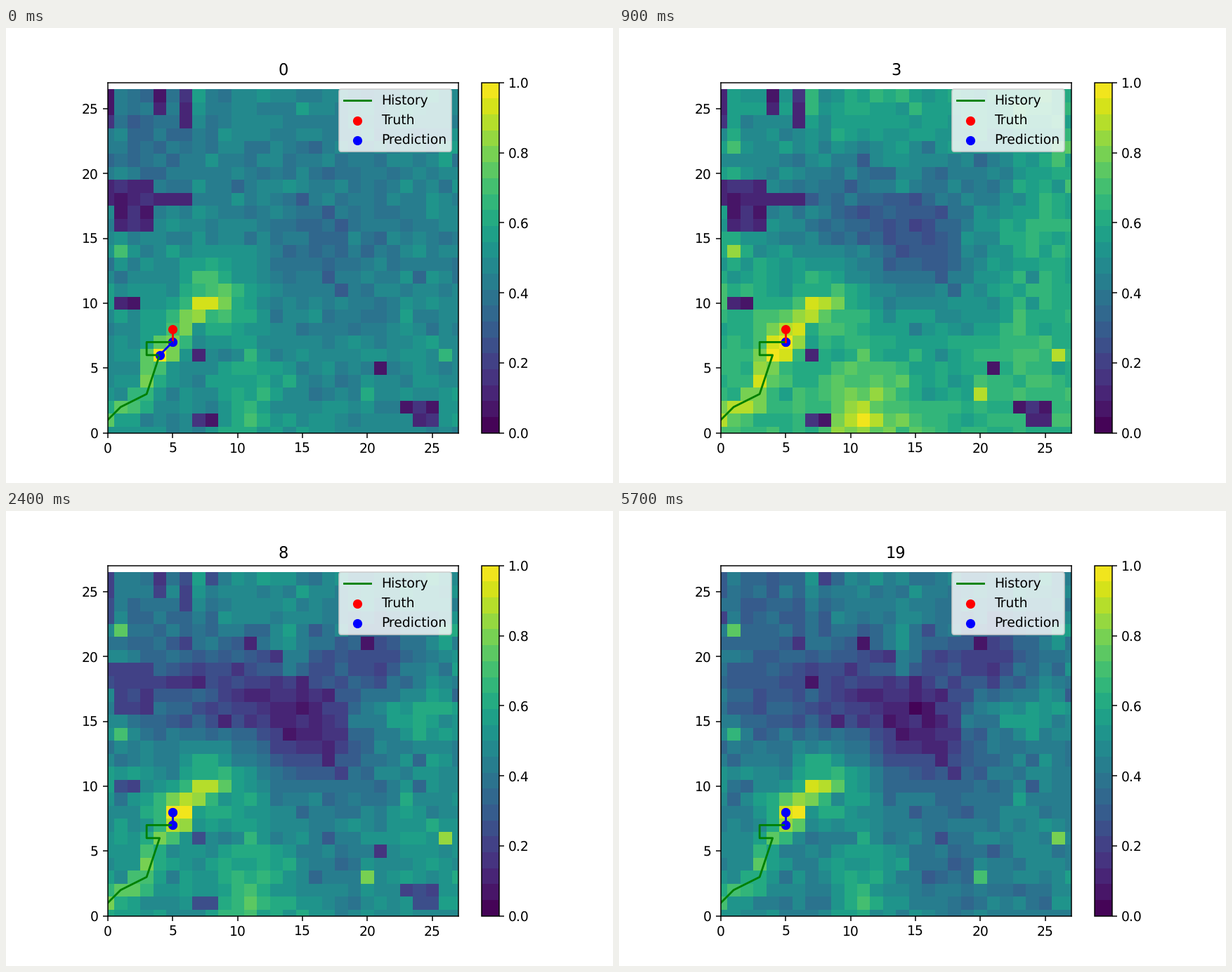
Animation, 864 px wide and 648 px high, one loop 6 s. Source, as a matplotlib script:

```python
import numpy as np
import matplotlib.pyplot as plt
from matplotlib.animation import FuncAnimation
from matplotlib.colors import ListedColormap

FRAMES, INTERVAL = 20, 300
ROWS, COLS = 27, 28
X, Y = np.meshgrid(np.arange(COLS), np.arange(ROWS))
PHASES = (0, 2, 4, 6, 11)

# Soft bumps: centre x, y, spread x, y, height.
STEADY = (
    (8, 10.5, 3, 2.5, .25), (11, 2, 2.5, 5, .15), (17, 16, 6, 7, -.11),
    (3, 23, 4, 5, -.12), (1, 14, .6, .6, .2), (20, 3, .5, .5, .15),
    (26, 6, .5, .5, .15))
GLOW = ((11, 1, 5, 2, .12), (22, 4, 3, 4, .06), (8, 11, 3, 2, -.14))
NIGHT = (
    (11, 17, 6, 4, -.2), (15, 14.5, 3, 4, -.12), (18, 12, 3, 3, -.09),
    (21, 20, 3, 3, -.17), (18, 3, 3, 4, -.08), (4, 15, 3, 3, -.07),
    (14, 21, 1, 2.5, .2), (23, 15.5, 4, 1.5, .16), (1, 22, .5, .5, .3),
    (20, 3, .5, .5, .17), (26, 6, .5, .5, .14))
# Dark walls: first and last column, first and last row.
WALLS = (
    (0, 3, 18, 19), (1, 3, 16, 17), (4, 6, 18, 18), (0, 0, 24, 26),
    (6, 6, 24, 26), (4, 4, 25, 26), (1, 2, 10, 10), (7, 8, 1, 1),
    (7, 7, 6, 6), (21, 21, 5, 5), (23, 25, 2, 2), (24, 25, 1, 1))
TRAIL = ((0, 1), (2, 2.5), (3, 4), (4, 6), (5, 7), (6, 9), (8, 10))


def bump(x, y, sx, sy, height):
    return height * np.exp(-((X - x) / sx) ** 2 - ((Y - y) / sy) ** 2)


def relief(bumps):
    return sum(bump(*b) for b in bumps)


def trail_distance():
    legs = []
    for (x0, y0), (x1, y1) in zip(TRAIL, TRAIL[1:]):
        dx, dy = x1 - x0, y1 - y0
        t = ((X - x0) * dx + (Y - y0) * dy) / (dx * dx + dy * dy)
        t = np.clip(t, 0, 1)
        legs.append(np.hypot(X - x0 - t * dx, Y - y0 - t * dy))
    return np.min(legs, axis=0)


rng = np.random.default_rng(12)
grain = rng.normal(0, .04, (ROWS, COLS))
shade = rng.uniform(.06, .17, (ROWS, COLS))
specks = rng.random((ROWS, COLS)) < .03

walls = np.zeros((ROWS, COLS), bool)
for left, right, low, high in WALLS:
    walls[low:high + 1, left:right + 1] = True

trail = .23 * np.exp(-(trail_distance() / .9) ** 2)
rim = .2 - bump(12, 16, 9, 8, .2)
steady = .48 + relief(STEADY) + trail + grain
glow = rim + relief(GLOW)
night = relief(NIGHT) - .04


def heat(n):
    shine = np.interp(n, PHASES, (0, .8, 1, .55, .1))
    dusk = np.interp(n, PHASES, (0, .15, .9, 1.1, 1.1))
    decay = np.interp(n, (6, 11), (0, .7))
    t = min(n / 8, 1)
    field = steady + shine * glow + dusk * night
    field = field + bump(4 + 1.2 * t, 6.2 + 1.6 * t, 1.3, 1.4, .3)
    field = np.where(walls, shade + decay * (field - shade), field)
    field = field - .18 * min(dusk, 1) * (specks & ~walls & (trail < .05))
    jitter = np.random.default_rng(100 + n).normal(0, .006, (ROWS, COLS))
    return np.clip(field + jitter, .03, .97)


def predicted(n):
    if n < 3:
        return 4, 6
    return (5, 7) if n < 6 else (5, 8)


plt.rcParams["text.hinting"] = "no_hinting"
cmap = ListedColormap(plt.get_cmap("viridis")(np.linspace(.01, .98, 22)))
fig, ax = plt.subplots(figsize=(6.4, 4.8), dpi=135)
image = ax.imshow(heat(0), cmap=cmap, vmin=0, vmax=1, origin="lower",
                  interpolation="nearest")
fig.colorbar(image, ax=ax)

here, truth = (5, 7), (5, 8)
ax.plot([0, 1, 3, 4, 3, 3, 5], [1, 2, 3, 6, 6, 7, 7], color="green",
        label="History")
ax.plot(*zip(here, truth), color="red")
ax.scatter(*zip(here, truth), color="red", label="Truth")
link, = ax.plot([], [], color="blue")
dots = ax.scatter(*zip(here, here), color="blue", label="Prediction")
ax.set_xlim(0, 27)
ax.set_ylim(0, 27)
ax.legend(loc="upper right")
title = ax.set_title("0")


def update(n):
    image.set_data(heat(n))
    points = [here, predicted(n)]
    link.set_data(*zip(*points))
    dots.set_offsets(points)
    title.set_text(str(n))
    return image, link, dots, title


anim = FuncAnimation(fig, update, frames=FRAMES, interval=INTERVAL,
                     init_func=lambda: update(0), repeat=True, repeat_delay=0)
plt.show()
```
